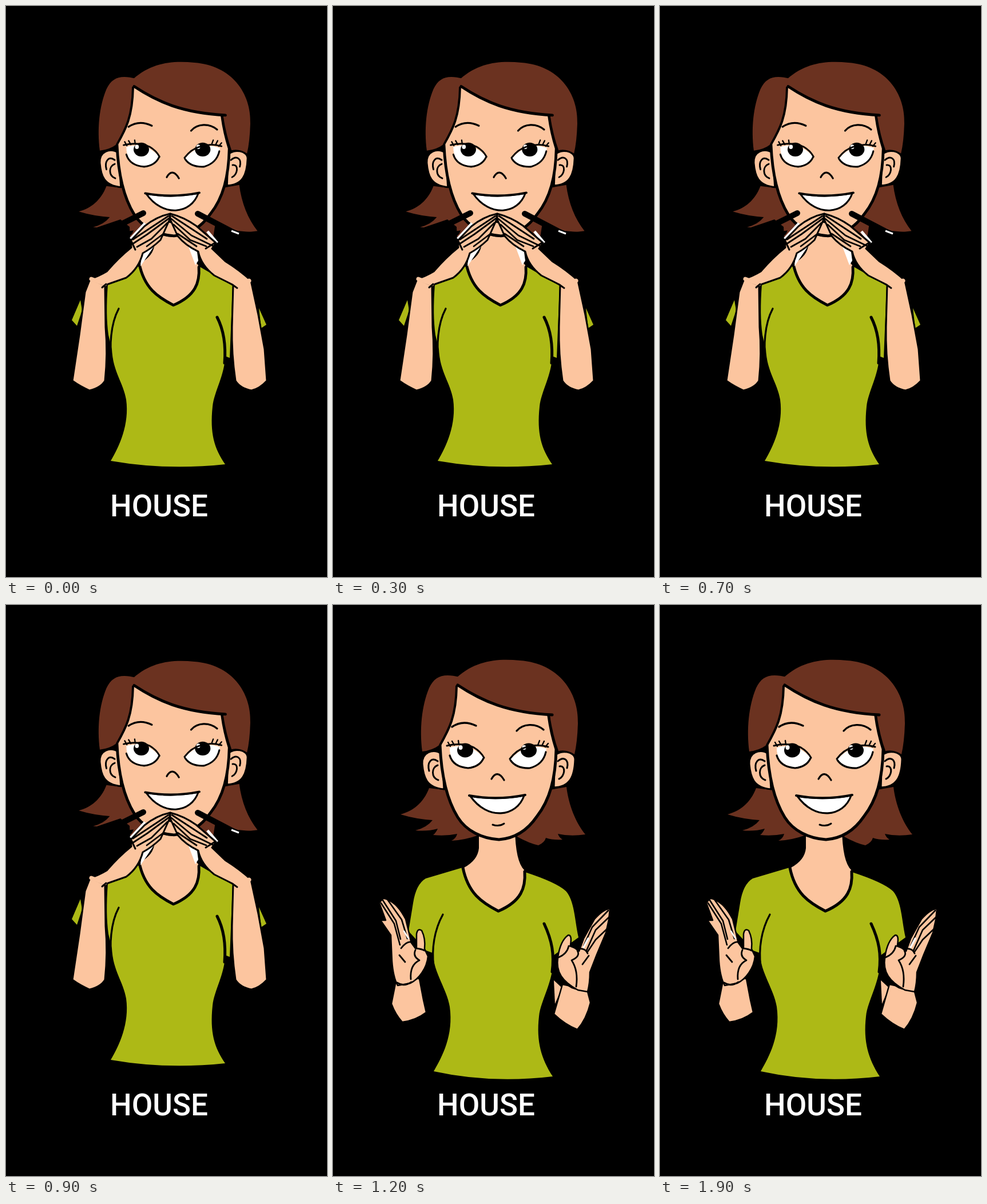
An HTML page with a canvas for the animation above (2 s loop, 561 px wide and 998 px high).

```html
<!DOCTYPE html>
<html lang="en">
<head>
<meta charset="utf-8">
<title>House sign</title>
<style>
  html, body { margin: 0; width: 100%; height: 100%; overflow: hidden; background: #000; }
  canvas { display: block; width: 561px; height: 998px; }
</style>
</head>
<body>
<canvas id="stage" width="561" height="998"></canvas>
<script>
const ctx = document.getElementById('stage').getContext('2d');
const HAIR = '#6b3220', SKIN = '#fcc59f', SHIRT = '#adb916', WHITE = '#fff', INK = '#000';
const LOOP = 2000, SWITCH = 1000;

function fill(d, color, edge = 0) {
  const p = new Path2D(d);
  ctx.fillStyle = color;
  ctx.fill(p);
  if (edge) { ctx.lineWidth = edge; ctx.stroke(p); }
}

function line(d, width, color = INK) {
  ctx.strokeStyle = color;
  ctx.lineWidth = width;
  ctx.stroke(new Path2D(d));
  ctx.strokeStyle = INK;
}

function dot(x, y, rx, ry, color) {
  ctx.fillStyle = color;
  ctx.beginPath();
  ctx.ellipse(x, y, rx, ry, 0, 0, 7);
  ctx.fill();
}

function lowerHair() {
  fill('M168 320C158 346 140 360 118 366Q144 374 174 376Q164 389 144 394Q165 396 183 391Q180 398 175 402Q198 404 217 400Q215 408 207 412Q230 411 255 402L250 330Z', HAIR);
  fill('M408 318C412 350 424 380 441 401Q415 405 393 400Q395 406 401 410Q384 411 372 407Q370 415 359 420Q344 417 322 405L340 330Z', HAIR);
}

function neck() {
  fill('M255 392L255 425Q253 446 229 459C233 499 261 521 289 534C328 518 338 494 334 463Q319 448 318 392Z', SKIN);
}

function neckline() {
  line('M227 459C236 504 260 520 289 535C329 518 337 494 335 466', 5);
}

function ears() {
  fill('M190 260C174 250 155 258 156 278C158 301 163 319 194 322Z', SKIN, 3);
  line('M183 273C172 265 164 275 168 290M183 280C172 284 171 301 184 306', 3);
  fill('M388 263C398 252 423 256 423 270C422 300 414 318 386 319Z', SKIN, 3);
  line('M393 273C403 264 413 270 409 285M396 282C408 280 405 300 395 304', 3);
}

function eyes() {
  const left = 'M204 249Q203 280 236 284Q258 281 263 267Q240 240 204 249Z';
  const right = 'M310 270Q318 286 344 284Q370 279 373 251Q337 239 310 270Z';
  for (const [d, x, lid] of [[left, 231, 'M199 246Q225 240 246 249Q258 256 264 267'],
                             [right, 342, 'M309 269Q321 253 336 249Q356 242 376 248']]) {
    fill(d, WHITE);
    dot(x, 254, 14, 12.5, INK);
    dot(x - 8, 249, 3.5, 4, WHITE);
    line(lid, 3);
  }
  line('M204 263Q210 283 236 285Q256 283 263 268M310 271Q320 286 344 285Q367 279 372 257', 3.2);
  line('M205 247L201 240M212 245L208 238M220 244L219 237M358 245L361 237M365 246L369 238M371 248L376 242', 2.4);
}

function face() {
  fill('M216 138C260 166 310 187 378 192C381 220 391 240 389 269C389 322 367 361 347 383C326 403 306 410 290 410C264 409 237 397 221 374C202 345 194 314 191 283L187 245C202 214 216 193 216 138Z', SKIN);
  line('M187 245C189 293 197 337 218 371C233 395 260 408 290 410C316 408 339 395 356 370C379 341 389 303 390 252Q381 224 377 194', 5);
  line('M208 213Q227 200 250 211M321 220C332 207 354 206 368 218', 3.4);
  eyes();
  line('M277 304C283 293 291 292 299 306', 3.2);
  fill('M240 334Q286 342 334 333C321 371 270 377 240 334Z', WHITE, 3.2);
  line('M238 333Q286 342 336 332', 4);
  line('M279 384Q290 388 299 382', 3);
}

function upperHair() {
  fill('M221 126C193 119 178 124 168 145C155 176 151 217 156 256Q174 254 187 244C205 221 217 191 217 139Z', HAIR);
  fill('M217 126C250 97 287 93 327 97C394 102 430 152 428 207Q427 240 422 261Q407 251 391 256Q381 223 379 192C318 190 268 168 217 138Z', HAIR);
  line('M218 140C260 168 305 188 383 192', 5);
  line('M216 142C215 195 203 217 187 245', 4);
  line('M377 194Q383 231 392 255', 4);
}

function head() {
  lowerHair();
  neck();
  ears();
  face();
  upperHair();
}

function torso() {
  fill('M226 459L162 478Q145 488 140 521L132 570L163 604L174 608C177 645 199 671 204 702C211 752 191 789 176 815Q276 837 384 824C364 793 355 763 360 719C363 690 385 661 386 612L429 581C422 548 422 517 407 500Q391 485 336 467L289 534Z', SHIRT);
}

function seams() {
  line('M192 541C177 568 172 601 176 632', 3.2);
  line('M369 557C383 587 387 611 383 641', 5);
}

function openHands() {
  fill('M111 652L102 697Q109 716 121 729Q145 726 163 712L158 690L151 653Z', SKIN, 2.5);
  fill('M86 514Q90 511 97 516Q113 522 127 549Q132 569 136 587L146 599L146 575Q148 564 155 569Q162 583 160 601L166 614C164 635 150 654 135 661L113 665Q105 650 103 622L101 577L83 551L92 551L81 521Z', SKIN, 2.5);
  line('M87 516L110 552L118 584M96 516L120 550L130 583M84 521L107 557L117 594', 2.6);
  line('M119 600Q128 588 136 589L144 600Q155 601 160 604M144 603Q139 614 151 621Q134 629 136 654M116 612L126 624M112 660Q124 668 137 659', 2.8);
  line('M124 570L132 583', 2.5, WHITE);

  fill('M386 656L400 669L388 697Z', SKIN);
  fill('M401 663L386 715Q406 734 427 742Q443 724 450 695L444 672Z', SKIN, 2.5);
  fill('M484 531Q473 531 457 549L438 583L430 605L415 594Q418 576 411 577Q397 587 393 616C389 642 401 658 428 673L445 676Q449 661 449 642L461 611L477 573L482 550Z', SKIN, 2.5);
  line('M481 534L453 563L438 596M484 544L459 568L443 604M479 566L459 585L445 606', 2.6);
  line('M412 596Q409 610 394 616M414 596L427 601Q441 599 445 609M427 604Q433 614 417 621Q429 639 425 667M447 613L436 628M397 651Q411 668 424 671', 2.8);
  line('M446 583L438 598', 3.5, WHITE);
}

function raisedTorso() {
  fill('M231 455L178 487Q174 540 179 575L185 600C187 640 205 658 210 688C216 731 198 770 183 795Q280 812 383 801C364 773 356 747 361 700C364 673 382 646 383 612L391 615L396 489L339 456L292 523Z', SHIRT);
  line('M197 529C182 557 181 597 185 619', 3.2);
  line('M369 544C383 571 384 599 382 624', 5);
  fill('M130 514L115 549L124 559L133 532Z', SHIRT);
  fill('M442 528L455 557L446 563Z', SHIRT);
}

function joinedHands() {
  // hair and sleeves hidden behind the hands
  fill('M153 389L200 373L216 386L217 407L175 450L130 430Z', INK);
  fill('M366 379L405 393L437 396L430 450L390 440L362 405Z', INK);
  line('M180 392L240 362M335 363L400 397', 10);
  ctx.lineCap = 'butt';
  line('M218 407L243 380M352 394L369 414', 5, WHITE);
  line('M394 393L407 398', 3, WHITE);
  ctx.lineCap = 'round';
  fill('M238 427L264 412L235 455Z', WHITE);
  fill('M318 418L334 430L336 445L331 453Z', WHITE);

  fill('M147 477L138 500L128 575L116 655Q130 665 146 672Q166 667 173 655Q178 607 174 561L173 488Z', SKIN, 3);
  fill('M428 480L441 540L452 600L456 655Q443 669 429 672Q409 668 401 655Q394 608 395 561L397 488Z', SKIN, 3);
  fill('M287 363Q263 368 242 385L218 410L219 422C204 434 188 450 176 464Q161 473 147 477L173 488L210 475Q232 459 239 432Q254 424 270 409L286 373Z', SKIN, 3);
  fill('M287 363Q311 369 332 384L367 414L360 424L383 446Q410 463 428 480L398 488L364 471Q341 453 336 429Q314 419 300 402L287 373Z', SKIN, 3);
  line('M149 477L173 486', 7, SKIN);
  line('M401 486L425 480', 7, SKIN);
  line('M284 367L222 408M285 371L247 399L221 416M282 379L254 407L229 421M274 399L246 420', 2.8);
  line('M290 367L351 407M289 372L324 401L361 419M293 382L322 409L350 420M300 398L333 420', 2.8);
  line('M219 411L226 426M365 414L349 424M175 486L168 492M397 488L404 493', 3);
  line('M278 401Q289 405 300 401', 1.5);
}

function caption() {
  ctx.fillStyle = WHITE;
  ctx.font = '500 53px Roboto, sans-serif';
  ctx.textAlign = 'center';
  ctx.fillText('HOUSE', 267.5, 892);
}

function draw(t) {
  const raised = t % LOOP < SWITCH;
  ctx.fillStyle = INK;
  ctx.fillRect(0, 0, 561, 998);
  ctx.strokeStyle = INK;
  ctx.lineCap = ctx.lineJoin = 'round';
  if (raised) raisedTorso(); else torso();
  ctx.save();
  if (raised) ctx.transform(0.967, 0, 0, 0.968, 13.1, 5);
  head();
  neckline();
  if (!raised) seams();
  ctx.restore();
  if (raised) joinedHands(); else openHands();
  caption();
}

const start = performance.now();
function tick() {
  draw(performance.now() - start);
  requestAnimationFrame(tick);
}
tick();
</script>
</body>
</html>
```
